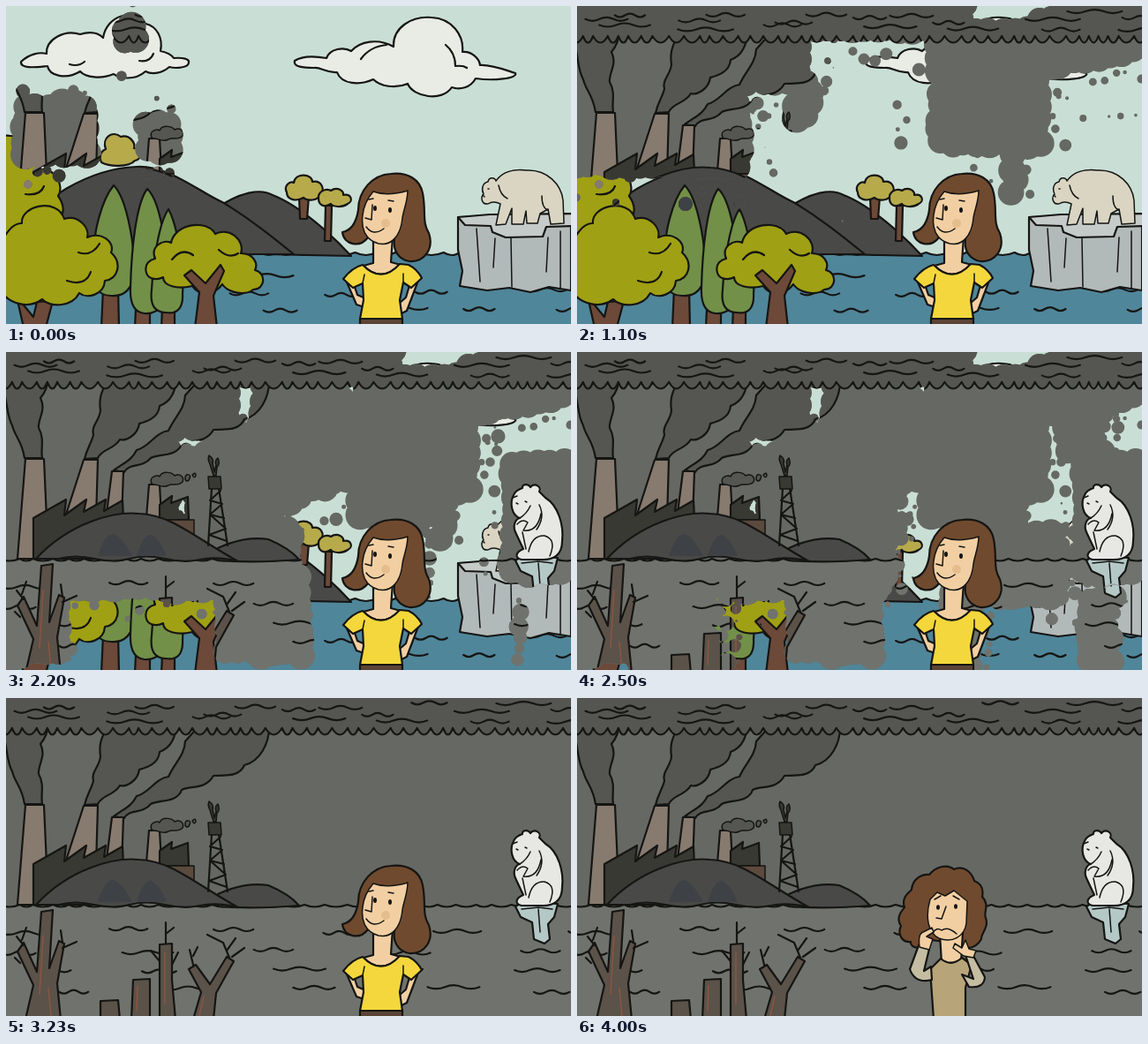
Write an HTML page that moves like this. It is 640 px wide and 360 px high and loops after 4.06 s.

```html
<!DOCTYPE html>
<html lang="en">
<head>
<meta charset="utf-8">
<title>Clean to polluted</title>
<style>
html,body{margin:0;width:100%;height:100%;overflow:hidden;background:#646660}
svg{display:block;width:100vw;height:100vh}
path{stroke:#151513;stroke-width:2.2;stroke-linejoin:round;stroke-linecap:round}
.n{stroke:none}
.l{fill:none}
.t{stroke-width:1.5}
.sky{fill:#c9dfd6}.sea{fill:#50869a}.cloud{fill:#e9ebe5}
.hill{fill:#494947}.olive{fill:#a0a014}.bush{fill:#b6aa4b}.cyp{fill:#729048}
.trunk{fill:#6c4939}.smog{fill:#555652}.brick{fill:#877a6f}.works{fill:#393933}
.dead{fill:#5b5249}.skin{fill:#f2cfa3}.hair{fill:#704a2e}.ice{fill:#b2bab9}
</style>
</head>
<body>
<svg viewBox="0 0 640 360">
<defs>
  <clipPath id="spill"><path id="blobs"/></clipPath>
  <!-- one group per phase: the lines that the pollution spreads along -->
  <g id="strokes">
    <g>
      <path d="M22 142H92" data-width="60"/>
      <path d="M132 36H150" data-width="22"/>
      <path d="M160 150H200" data-width="30"/>
    </g>
    <g>
      <path d="M0 50H260" data-width="96"/>
      <path d="M0 150H185" data-width="80"/>
      <path d="M270 18H440" data-width="40"/>
    </g>
    <g>
      <path d="M460 30V165" data-width="125"/>
      <path d="M530 45L645 18" data-width="60"/>
      <path d="M488 170V215" data-width="12"/>
      <path d="M250 85V135" data-width="25"/>
    </g>
    <g>
      <path d="M215 165L400 95" data-width="90"/>
      <path d="M290 65H380" data-width="50"/>
      <path d="M400 150H500" data-width="70"/>
      <path d="M602 125V260" data-width="58"/>
      <path d="M308 245V320" data-width="14"/>
    </g>
    <g>
      <path d="M0 235H335" data-width="75"/>
      <path d="M30 230V350" data-width="60"/>
      <path d="M250 305H345" data-width="95"/>
    </g>
    <g>
      <path d="M70 320H245" data-width="110"/>
      <path d="M310 220H410" data-width="100"/>
      <path d="M555 78H645" data-width="75"/>
      <path d="M480 240H640" data-width="70"/>
      <path d="M580 320H640" data-width="80"/>
      <path d="M425 315H490" data-width="85"/>
    </g>
    <g>
      <path d="M0 180H640" data-width="360"/>
    </g>
  </g>
</defs>

<g id="clean">
  <rect class="sky" width="640" height="360"/>
  <path class="cloud" d="M17 63C27 54 38 52 46 54C45 38 66 26 84 32C94 29 104 30 110 36C114 10 145 2 158 20C171 23 178 36 175 51C185 53 188 56 190 59C200 58 208 60 207 64C207 70 192 71 185 69C177 76 166 78 158 74C146 85 128 82 122 77C108 83 90 81 84 74C68 84 49 79 47 68C36 69 16 72 17 63Z"/>
  <path class="l" d="M72 66Q82 69 89 63M151 62Q163 64 167 54"/>
  <path class="cloud" d="M327 62C336 56 352 57 363 59C367 48 383 46 391 51C401 40 421 36 439 46C438 24 460 11 482 13C505 14 519 33 517 52C527 51 536 59 537 67C549 66 564 72 577 76C580 82 552 85 532 82C526 93 514 95 505 92C494 109 461 103 455 88C441 94 424 91 416 83C401 90 380 89 375 75C362 76 357 69 349 70C337 70 325 69 327 62Z"/>
  <path class="l" d="M402 60Q412 46 431 44M498 44Q509 53 509 68Q518 67 522 70"/>
  <path class="sea" id="sea"/>
  <path class="l" id="ripples"/>
  <path class="hill" d="M240 228C265 211 288 206 302 214C333 226 370 260 391 283L250 280Z"/>
  <path class="hill" d="M-4 270C40 216 95 184 148 182C184 180 218 210 245 222C275 240 300 260 326 281H-4Z"/>
  <path class="trunk" d="M332 216L333 241H341L343 216ZM362 226L361 266H368L369 226Z"/>
  <path class="bush" d="M318 211C314 203 322 198 326 200C328 188 347 190 347 199C357 197 362 207 356 213C354 221 341 221 337 217C328 222 318 219 318 211Z"/>
  <path class="bush" d="M354 218C353 210 362 206 368 209C375 204 383 209 382 214C391 212 394 221 387 224C380 229 370 227 368 224C360 229 354 225 354 218Z"/>
  <path class="bush" d="M108 177C104 168 110 163 113 162C108 149 121 140 130 148C140 145 147 155 145 161C155 162 154 174 146 175C139 183 117 182 108 177Z"/>
  <path class="olive" d="M-4 147C8 145 19 150 20 161C35 160 42 175 38 185C58 184 66 205 59 215C73 235 58 252 40 250L-4 266Z"/>
  <path class="l" d="M9 175Q23 171 25 184M22 213Q39 215 43 204"/>
  <path class="trunk" d="M110 320H127L128 364H108ZM147 342H163V364H146ZM177 342H191V364H176Z"/>
  <path class="cyp" d="M122 203C137 218 147 275 144 300C145 320 134 329 119 328C102 328 96 313 98 290C99 256 108 220 122 203Z"/>
  <path class="cyp" d="M160 207C176 222 183 280 182 310C183 340 171 349 157 348C145 347 140 337 141 318C142 278 147 224 160 207Z"/>
  <path class="cyp" d="M184 230C195 250 202 300 200 326C201 344 192 349 181 347C168 347 163 338 165 321C167 288 173 246 184 230Z"/>
  <path class="trunk" d="M12 329L31 352L35 335L53 334L45 364H20Z"/>
  <path class="olive" d="M-4 264C4 252 9 246 18 246C16 226 58 216 66 241C82 236 95 251 92 262C108 255 124 267 119 279C132 291 127 309 112 311C111 327 92 332 83 325C74 342 49 341 41 332C25 344 4 336-4 325Z"/>
  <path class="l" d="M82 279Q97 284 106 269M69 311Q90 318 96 301"/>
  <path class="olive" d="M159 302C156 291 164 287 169 286C163 272 178 264 187 268C191 246 228 241 237 258C253 250 271 265 266 280C280 280 286 291 282 299C295 302 294 321 280 321C270 329 251 324 245 315C235 329 217 327 211 317C194 321 178 317 178 307C170 311 161 309 159 302Z"/>
  <path class="l" d="M188 287Q199 273 212 282M241 276Q253 287 263 280"/>
  <path class="trunk" d="M202 305L210 299L226 314L243 293L247 300L235 328L239 364H214L219 324Z"/>
  <path class="ice" d="M512 239L640 235V322L615 318L594 324L570 319L545 322L514 317L517 300L512 276Z"/>
  <path fill="#c4cbc8" d="M512 239L548 236L644 235V249L612 250L608 261L566 262L551 256L549 249L520 248Z"/>
  <path class="l t" d="M533 252L537 312M554 263L552 296M572 263L573 318M614 262L612 301M628 255V319"/>
  <path fill="#dad5c2" class="t" d="M541 213C538 207 540 200 546 199C547 193 554 194 555 198C562 188 575 184 590 186C613 185 629 202 631 220L632 246L617 247L614 230L605 235L602 246H590L589 232L586 247H573L573 229L566 247L555 248L560 224Q552 220 546 224C539 225 537 217 541 213Z"/>
  <path class="l t" d="M546 207h1M540 214l2 2M558 203Q560 214 568 218M607 215Q607 229 614 231"/>
</g>

<g clip-path="url(#spill)">
  <rect fill="#666863" width="640" height="360"/>
  <path fill="#70736d" id="murk"/>
  <path class="l" id="murkRipples"/>
  <path class="smog" d="M21 120C18 100 10 96 7 83C0 70 2 55-4 40V20H46C50 35 45 45 39 52C46 66 36 75 37 86C44 98 39 110 41 120Z"/>
  <path class="smog" d="M89 121C92 108 96 105 99 94C96 83 106 78 107 66C104 48 112 40 117 26H193C193 46 185 57 174 61C173 75 158 79 151 81C149 95 135 101 129 99C122 111 109 109 104 120Z"/>
  <path class="smog" d="M122 134C134 125 142 123 148 111C162 108 169 91 184 89C191 73 202 66 203 49L220 30H298C299 52 287 72 270 76C264 91 243 87 235 88C226 104 209 99 199 104C194 119 173 115 164 120C154 132 140 125 134 136Z"/>
  <path class="brick" d="M13 234L22 121H43L48 234ZM66 190L88 122H104L102 190ZM113 190L120 135H133L131 190ZM159 187L162 150H174L176 187Z"/>
  <path class="works" d="M31 234V188L68 167L66 185L91 167L88 181L113 167L111 180L132 168L133 189V234ZM174 190V173L188 163L187 171L206 164L207 190Z"/>
  <path fill="#5b4a3d" class="t" d="M180 190H213V211H180Z"/>
  <path class="smog t" d="M166 150C160 143 170 138 174 141C177 134 188 136 191 140C198 137 202 142 200 147C194 153 188 148 184 151C177 155 172 149 166 150ZM203 143C202 137 211 138 208 143C207 147 203 147 203 143ZM211 139q4-4 4 1q-2 4-4-1"/>
  <path class="hill" d="M240 222Q270 208 297 212Q321 222 332 235Q282 239 240 236Z"/>
  <path class="hill" d="M34 234C72 193 123 180 151 183C188 184 218 213 263 237Q238 231 220 235T180 234T140 234T100 234T60 234Z"/>
  <path fill="#3e4145" class="n" d="M104 231Q112 206 121 206Q130 207 143 231ZM148 231Q156 205 165 207Q175 213 182 231Z"/>
  <path class="l" d="M229 219L233 154H241L251 219M231 184L245 172L231 168L243 157M230 207L249 200L231 184L247 188M230 207L250 214"/>
  <path class="works t" d="M229 141H243L244 155H230ZM235 140L231 127Q228 121 230 117Q236 121 234 126L236 136L238 128Q236 123 240 120Q243 127 239 130L238 140Z"/>
  <path class="smog" id="smogBank"/>
  <path class="l" id="swirls"/>
  <path class="dead" d="M22 364L31 325L13 287L20 277L35 310L40 242L53 240L49 306L60 275L66 278L58 323L62 364ZM107 364V343L127 342L129 364ZM142 364L144 319L163 318L163 364ZM174 364V320L174 279L188 278V319L192 364ZM212 364L221 333L207 307L215 302L231 324L250 293L258 298L238 334L235 364Z"/>
  <path class="l" d="M20 280L12 270M18 274L23 260M16 300L10 294M64 277L62 263M64 283L80 276M181 278V254M181 267L190 260M174 298L164 286M188 302L195 288M212 302L208 285M212 292L217 282M253 294L246 277L228 268M250 286L260 272M256 293L270 283"/>
  <path class="l t" style="stroke:#8b5540" d="M42 270L38 335M48 328L51 360M149 326L148 354M180 288V346M224 338L219 359"/>
  <path fill="#b4c8c6" d="M577 236L585 231L625 233L621 248L614 256L616 273L610 278L598 273L596 254L583 248Z"/>
  <path class="l t" d="M584 239L603 237L619 239M603 239L605 265"/>
  <path fill="#e7e8e4" d="M585 154C584 149 592 149 594 153C599 147 607 153 604 158L611 165C626 174 632 197 630 214C630 230 620 236 605 235H584C575 233 578 226 586 223L578 206C573 197 577 189 582 188C573 185 570 171 575 162C577 157 582 155 585 154Z"/>
  <path class="l t" d="M574 165l5-2M578 171l2 1M588 169l2 1M582 188Q590 183 594 174M579 195Q585 188 591 193L586 202Q602 204 606 183M585 204L589 223M604 173Q611 187 601 201M592 226Q596 207 610 208Q624 212 616 231"/>
</g>

<g id="happy">
  <path class="hair" d="M436 190C455 188 469 196 472 212C476 232 471 245 479 257C485 275 474 290 457 289C445 287 438 277 440 264L410 262C401 274 383 271 381 256C392 254 397 244 399 231C399 209 415 191 436 190Z"/>
  <path class="skin" d="M416 262L416 291L405 294Q424 314 447 293L436 290L438 261Z"/>
  <path class="skin t" d="M416 210Q432 216 455 209C455 221 450 232 449 240C447 260 437 272 422 269C407 265 402 252 404 237C405 226 410 217 416 210Z"/>
  <path class="n" fill="#e5bd8c" d="M425 246a5 5 0 1 1 10 0a5 5 0 1 1-10 0"/>
  <path class="l t" d="M415 225L414 242L407 240M408 250Q416 261 428 252M411 219l5-1M433 220l6 1"/>
  <path class="n" fill="#151513" d="M416 229a2 3 0 1 1 4 0a2 3 0 1 1-4 0M433 231a2 3 0 1 1 4 0a2 3 0 1 1-4 0"/>
  <path class="skin" d="M384 308L397 338L406 341L405 330L398 327L393 312ZM468 308L454 345L446 349L446 336L453 330L458 313Z"/>
  <path fill="#f4d73c" d="M404 293Q425 315 446 292L456 293Q466 298 471 308L459 319L450 313L446 333L449 354H401L405 333L404 314L393 319L382 309Q392 296 404 293Z"/>
  <path fill="#5b4436" d="M401 354H449V364H401Z"/>
  <path class="l t" d="M404 314L406 304M450 313L450 303"/>
</g>

<g id="sad">
  <path class="hair" d="M399 200C407 190 420 188 427 194C438 189 447 197 450 207C461 211 460 220 459 225C468 234 460 243 463 249C467 260 457 267 458 273C450 287 435 284 430 278L402 274C393 287 377 284 378 276C367 277 363 266 367 258C361 249 367 242 371 237C367 226 376 220 379 217C380 205 390 199 399 200Z"/>
  <path class="skin" d="M411 267L413 300Q426 309 435 300L437 265Z"/>
  <path class="skin t" d="M400 228L408 220L417 224L427 218L442 230L441 255C439 270 425 278 410 272C398 266 394 249 400 228Z"/>
  <path class="l t" d="M418 236L413 250L407 249M405 228l7-4M426 224l7 4M403 266Q407 259 413 263Q420 258 430 267"/>
  <path class="n" fill="#151513" d="M407 237a2 2.8 0 1 1 4 0a2 2.8 0 1 1-4 0M427 236a2 2.8 0 1 1 4 0a2 2.8 0 1 1-4 0"/>
  <path fill="#b7a478" d="M412 295Q424 305 436 294L447 302L440 328V364H404L400 307Z"/>
  <path fill="#c5bda2" d="M387 280L377 307Q383 324 402 319L401 304L393 309L399 284ZM448 290L462 316Q461 329 444 327L436 313L449 318L440 291Z"/>
  <path class="skin t" d="M388 282Q386 267 392 265L402 260L404 265L396 270L403 273L399 285ZM438 292L426 283L428 278L436 283L440 274L444 284L452 286L449 294Z"/>
</g>
</svg>
<script>
const LOOP = 4060, PHASE = 533, SPREAD = 400, GROW = 100, STEP = 14;
const $ = id => document.getElementById(id);
const draw = (id, d) => $(id).setAttribute('d', d);

let seed = 41;
const random = () => (seed = seed * 16807 % 2147483647) / 2147483647;
const between = (a, b) => a + (b - a) * random();

// A filled band whose edge at y is a row of uneven scallops
function band(y, far, size, dip) {
  let d = `M-8 ${far}V${y}`;
  for (let x = -8; x < 650;) {
    const w = size * between(.7, 1.3);
    d += `q${w / 2} ${dip} ${w} 0`;
    x += w;
  }
  return d + `V${far}Z`;
}

// Short wavy strokes in staggered rows
function ripples(left, right, top, bottom, rowGap, gap) {
  let d = '';
  for (let y = top; y <= bottom; y += rowGap)
    for (let x = left + gap * between(-.3, .5); x < right; x += gap * between(.9, 1.2)) {
      const w = between(11, 21);
      d += `M${x} ${y + between(-3, 3)}q${w / 2} 4 ${w} 0t${w} 0t${w} 0`;
    }
  return d;
}

draw('sea', band(279, 364, 24, 6));
draw('murk', band(234, 364, 20, 5));
draw('smogBank', band(34, -8, 15, 15));
draw('ripples', ripples(260, 640, 306, 345, 18, 110));
draw('murkRipples', ripples(0, 640, 264, 350, 22, 130));
draw('swirls', ripples(0, 640, 8, 24, 8, 95));

// Each stroke becomes a lattice of jittered blobs with small drops along its sides
const blobs = [];
function spray(path, begin) {
  const length = path.getTotalLength(), half = path.dataset.width / 2;
  for (let s = 0; s <= length; s += STEP) {
    const a = path.getPointAtLength(s - 1), b = path.getPointAtLength(s + 1);
    const angle = Math.atan2(b.y - a.y, b.x - a.x);
    const start = begin + SPREAD * Math.sqrt(s / length);
    const add = (offset, size) => blobs.push({
      x: a.x - Math.sin(angle) * offset + between(-3, 3),
      y: a.y + Math.cos(angle) * offset + between(-3, 3),
      size, start: start + between(-30, 30)
    });
    for (let o = -half; o <= half; o += STEP) add(o, between(13, 17));
    for (const side of [-1, 1])
      if (random() < .6) add(side * (half + between(12, 34)), between(2, 8));
  }
}
document.querySelectorAll('#strokes > g').forEach((group, i) => {
  for (const path of group.children) spray(path, 30 + PHASE * (i - 1));
});

const circle = (x, y, r) => `M${x - r} ${y}a${r} ${r} 0 1 1 ${2 * r} 0a${r} ${r} 0 1 1 ${-2 * r} 0`;

function render(now) {
  const t = now % LOOP;
  let d = '';
  for (const b of blobs) {
    const r = b.size * Math.min(1, (t - b.start) / GROW);
    if (r > .5) d += circle(b.x, b.y, r);
  }
  draw('blobs', d);
  const fade = Math.min(1, Math.max(0, (t - 3230) / 740));
  $('happy').style.opacity = 1 - fade;
  $('sad').style.opacity = fade;
}

const begin = performance.now();
function tick() {
  render(performance.now() - begin);
  requestAnimationFrame(tick);
}
tick();
</script>
</body>
</html>
```
